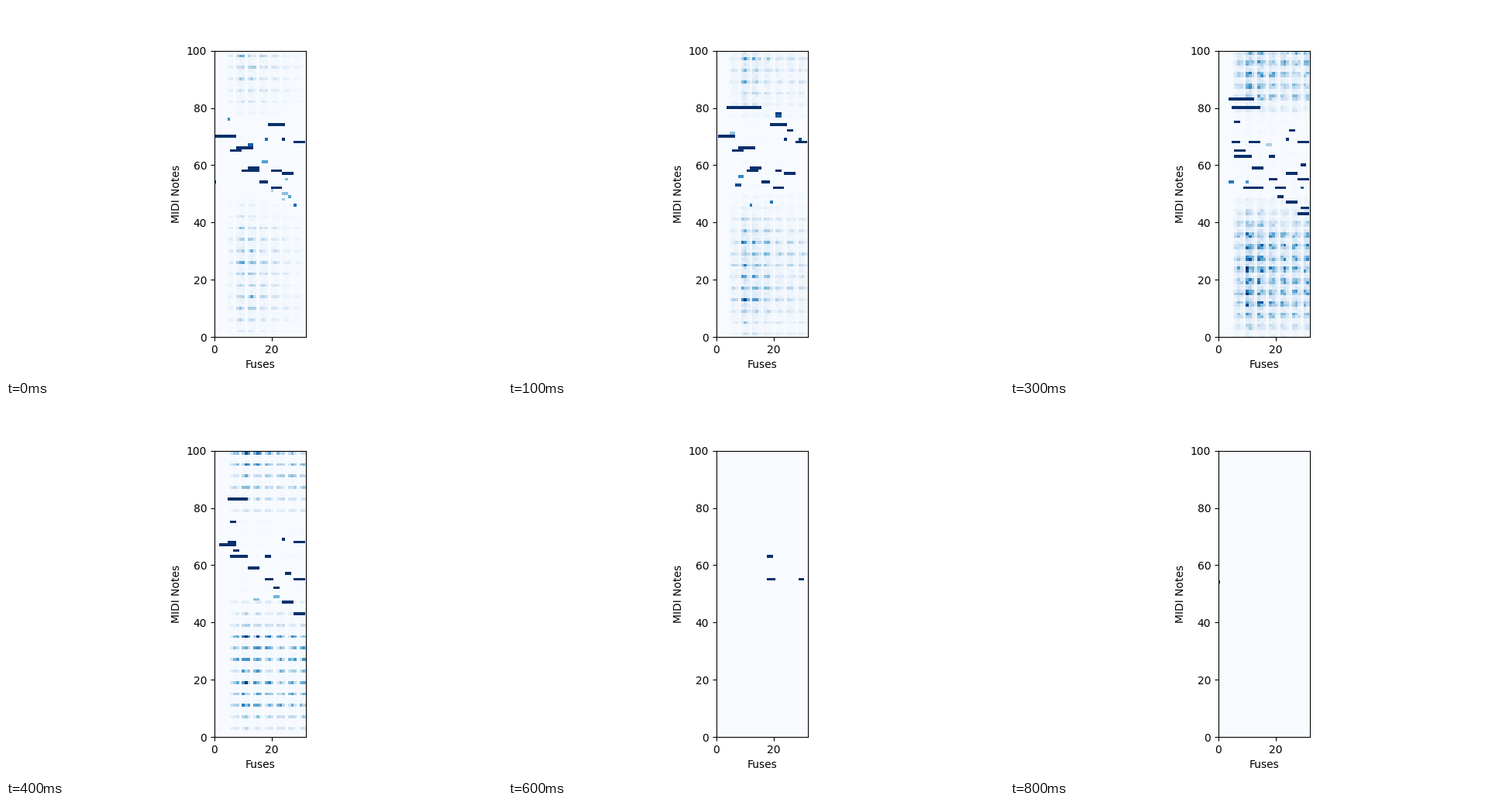
A matplotlib script that plays this animation: 640x480 px, repeating every 1200 ms.

```python
import numpy as np
import matplotlib.pyplot as plt
from matplotlib.animation import FuncAnimation

STEPS, STEP_MS = 12, 100
NOTES = np.arange(101)
FUSES = np.arange(33)

# Held notes: note, first fuse, last fuse, step it starts, step it ends
MELODY = [
    (80, 4, 15, 1, 3), (83, 4, 12, 3, 4), (75, 6, 7, 3, 5),
    (74, 19, 24, 0, 2), (72, 25, 26, 1, 3), (70, 0, 7, 0, 1),
    (69, 24, 24, 0, 4), (68, 28, 31, 0, 5), (68, 10, 15, 2, 3),
    (68, 5, 7, 2, 4), (67, 2, 7, 4, 5), (66, 8, 13, 0, 2),
    (65, 6, 9, 0, 4), (63, 6, 11, 2, 5), (63, 18, 19, 2, 6),
    (60, 28, 31, 2, 3), (59, 12, 15, 0, 5), (58, 10, 15, 0, 1),
    (58, 20, 23, 0, 1), (57, 24, 27, 0, 4), (55, 18, 20, 3, 6),
    (55, 28, 31, 2, 6), (54, 16, 18, 0, 1), (52, 8, 16, 2, 3),
    (52, 20, 23, 0, 4), (49, 20, 23, 2, 3), (47, 24, 27, 2, 5),
    (45, 29, 31, 2, 3), (43, 28, 31, 2, 5),
]


def offset(values, phase):
    """Distance to the nearest tooth of a comb with a tooth every 4 cells."""
    return np.abs((values - phase + 2) % 4 - 2)


def echoes(step):
    """Comb of harmonics that slides down while it swells and dies away."""
    rng = np.random.default_rng(step)
    row_phase = np.interp(step, [0, 2, 4], [2, 0, -1])
    col_phase = np.interp(step, [0, 2, 4], [1, 2.5, 3])
    gain = np.interp(step, [0, 2, 3, 4, 5, 6], [.55, .95, 1, .9, .03, 0])
    blur = np.interp(step, [0, 2, 3, 4], [.15, .3, .25, .03])
    tail = np.interp(step, [0, 2], [.05, .65])

    rows = np.clip(1.7 - 1.7 * offset(NOTES, row_phase), 0, 1)
    cols = np.clip(1.5 - .75 * offset(FUSES, col_phase), 0, 1)
    rows = blur + (1 - blur) * rows * rng.uniform(.7, 1.1, NOTES.size)
    rows *= np.interp(NOTES, [2, 12, 34, 42, 50, 76, 84, 99],
                      [.3, 1, 1, .4, .03, .03, .6, .9])
    cols *= np.interp(FUSES, [4, 10, 20, 31], [0, 1, max(tail, .4), tail])
    jitter = rng.uniform(.4, 1.3, (NOTES.size, FUSES.size))
    return gain * np.outer(rows, cols) * jitter


def add_melody(grid, step):
    for note, first, last, start, end in MELODY:
        if start <= step <= end:
            # A long note loses both ends just before it stops.
            trim = int(step == end and last - first > 2)
            grid[note, first + trim:last + 1 - trim] = 1


def add_passing(grid, step):
    """Short scattered notes around the melody in the busy opening."""
    rng = np.random.default_rng(40 + step)
    for _ in range(max(0, 10 - 2 * step)):
        first = rng.integers(4, 30)
        note = rng.integers(45, 79)
        grid[note, first:first + rng.integers(1, 3)] = rng.uniform(.3, 1)


def frame_grid(step):
    grid = echoes(step)
    add_passing(grid, step)
    add_melody(grid, step)
    # The first note waits alone at the end, then opens the next loop.
    cue = 1 if step == 0 else np.clip((step - 6) / 2, 0, 1)
    grid[54, 0] = max(grid[54, 0], cue)
    return grid


fig, ax = plt.subplots(figsize=(6.4, 4.8), dpi=100)
image = ax.imshow(frame_grid(0), cmap="Blues", origin="lower", vmin=0, vmax=1,
                  interpolation="nearest")
ax.set(xlim=(0, 32), ylim=(0, 100), xticks=(0, 20), yticks=range(0, 101, 20),
       xlabel="Fuses", ylabel="MIDI Notes")


def update(step):
    image.set_data(frame_grid(step))
    return [image]


anim = FuncAnimation(fig, update, frames=STEPS, interval=STEP_MS,
                     repeat=True, repeat_delay=0, blit=False)
plt.show()
```
